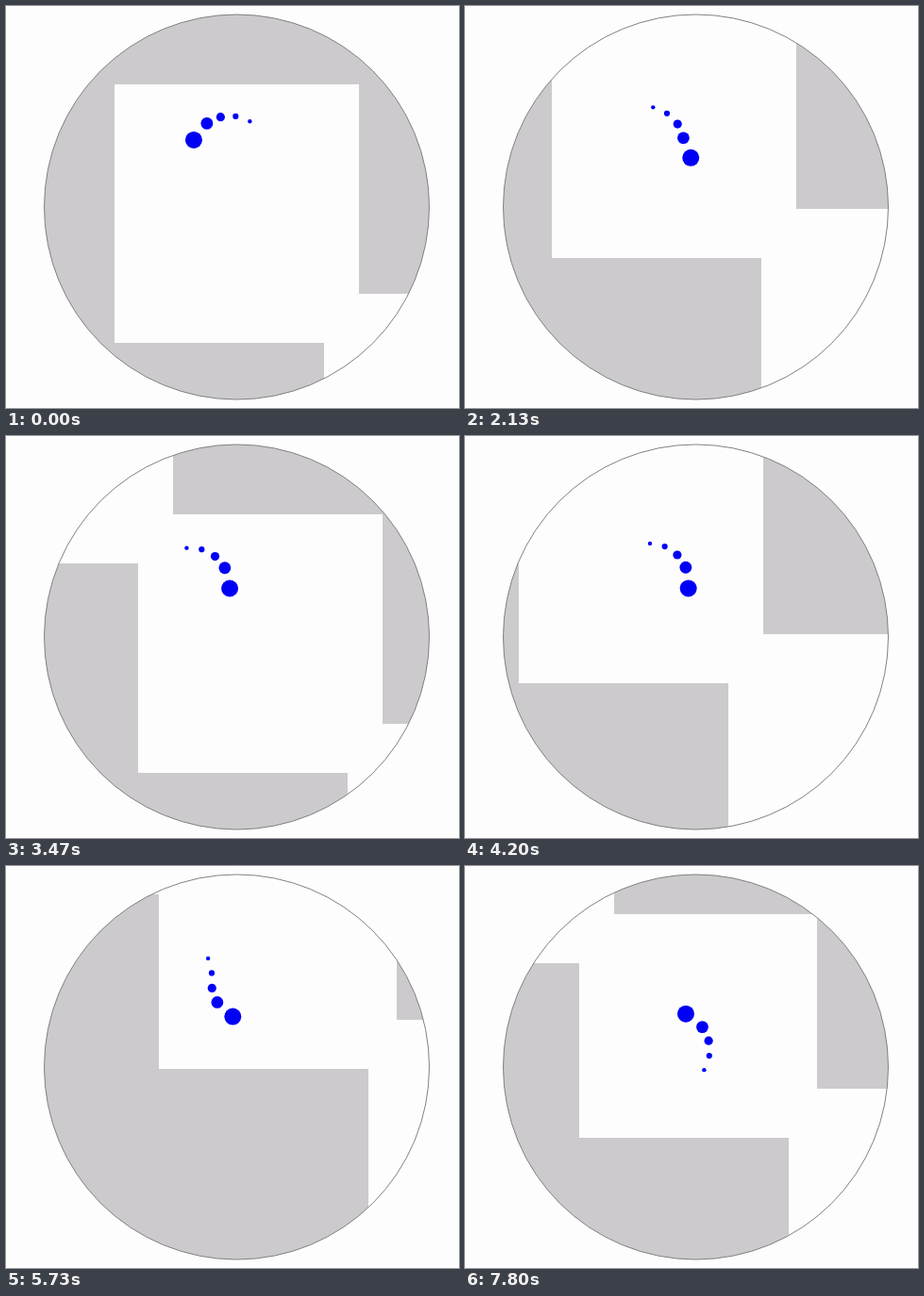
Animation, 480 px wide and 426 px high, one loop 7.87 s. Source, as an HTML page:

```html
<!DOCTYPE html>
<html lang="en">
<head>
<meta charset="utf-8">
<title>Circling swimmer</title>
<style>
  html, body { margin: 0; width: 100%; height: 100%; overflow: hidden; background: #fefdfe; }
  svg { display: block; width: 100vw; height: 100vh; }
</style>
</head>
<body>
<svg viewBox="0 0 480 426">
  <defs><clipPath id="lens"><circle cx="244.5" cy="213" r="204"/></clipPath></defs>
  <g clip-path="url(#lens)">
    <rect width="480" height="426" fill="#cccacd"/>
    <g id="rooms" fill="#fefdfe"></g>
  </g>
  <circle cx="244.5" cy="213" r="204" fill="none" stroke="#777" stroke-width="0.9"/>
  <g id="body" fill="#0000f5"></g>
</svg>
<script>
const LOOP = 7870, FRAME = 200 / 3, RADIUS = 41.5;
const VIEW = { x: 237.2, y: 158 };
const START = { x: 122, y: 75 };

// Overlapping rooms on a diagonal: x, y, width, height
const ROOMS = [[0, 0, 259, 274], [222, 222, 259, 274], [444, 444, 252, 237], [666, 629, 259, 274]];
// Body dots: radius and angular distance behind the head
const DOTS = [[9, 0], [6.4, 31.3], [4.6, 53.5], [3.1, 75.7], [2.2, 97.9]];
// Degrees turned before each change of turning direction
const TURNS = [456.8, 66, 66, 75, 116.6, 120.6, 95.5, 100.4, 100.9, 117.4, 70, 48.6, Infinity];
// Time in ms and total degrees turned
const PACE = [[0, 0], [1400, 360], [2870, 741.8], [3470, 899], [4930, 1291.8], [6470, 1694.3], [7800, 2045.8], [7870, 2064]];

const polar = (c, deg, r) => {
  const a = deg * Math.PI / 180;
  return { x: c.x + r * Math.cos(a), y: c.y + r * Math.sin(a) };
};

function add(parent, tag, attrs) {
  const el = document.createElementNS("http://www.w3.org/2000/svg", tag);
  for (const key in attrs) el.setAttribute(key, attrs[key]);
  return parent.appendChild(el);
}

// Each arc touches the next circle, which turns the other way
const arcs = [];
let centre = START, angle = 202.8, dir = -1, begin = 0;
for (const turn of TURNS) {
  arcs.push({ centre, angle, dir, begin });
  if (turn === Infinity) break;
  angle += dir * turn;
  centre = polar(centre, angle, 2 * RADIUS);
  angle += 180;
  dir = -dir;
  begin += turn;
}

function locate(s) {
  let arc = arcs[0];
  for (const a of arcs) if (s >= a.begin) arc = a;
  const deg = arc.angle + arc.dir * (s - arc.begin);
  return { ...polar(arc.centre, deg, RADIUS), heading: deg + 90 * arc.dir };
}

function turned(t) {
  let i = 1;
  while (i < PACE.length - 1 && t > PACE[i][0]) i++;
  const [t0, s0] = PACE[i - 1], [t1, s1] = PACE[i];
  return s0 + (s1 - s0) * (t - t0) / (t1 - t0);
}

// The camera rests until the first change of direction, then trails the head
function focusAt(s) {
  const head = locate(s);
  const goal = polar(head, head.heading, -3.5);
  const k = s < TURNS[0] ? 0 : 1 - Math.exp((TURNS[0] - s) / 8);
  return { x: START.x + (goal.x - START.x) * k, y: START.y + (goal.y - START.y) * k };
}

const rooms = document.getElementById("rooms");
const body = document.getElementById("body");
for (const [x, y, width, height] of ROOMS) add(rooms, "rect", { x, y, width, height });
const dots = DOTS.map(([r]) => add(body, "circle", { r }));

function draw(ms) {
  const t = Math.floor((ms % LOOP + 4) / FRAME) * FRAME;
  const s = turned(Math.min(t, LOOP - FRAME));
  const focus = focusAt(s);
  const dx = VIEW.x - focus.x, dy = VIEW.y - focus.y;
  rooms.setAttribute("transform", `translate(${Math.round(dx)} ${Math.round(dy)})`);
  DOTS.forEach(([, lag], i) => {
    const p = locate(s - lag);
    dots[i].setAttribute("cx", p.x + dx);
    dots[i].setAttribute("cy", p.y + dy);
  });
}

const origin = performance.now();
function tick() {
  draw(performance.now() - origin);
  requestAnimationFrame(tick);
}
tick();
</script>
</body>
</html>
```
